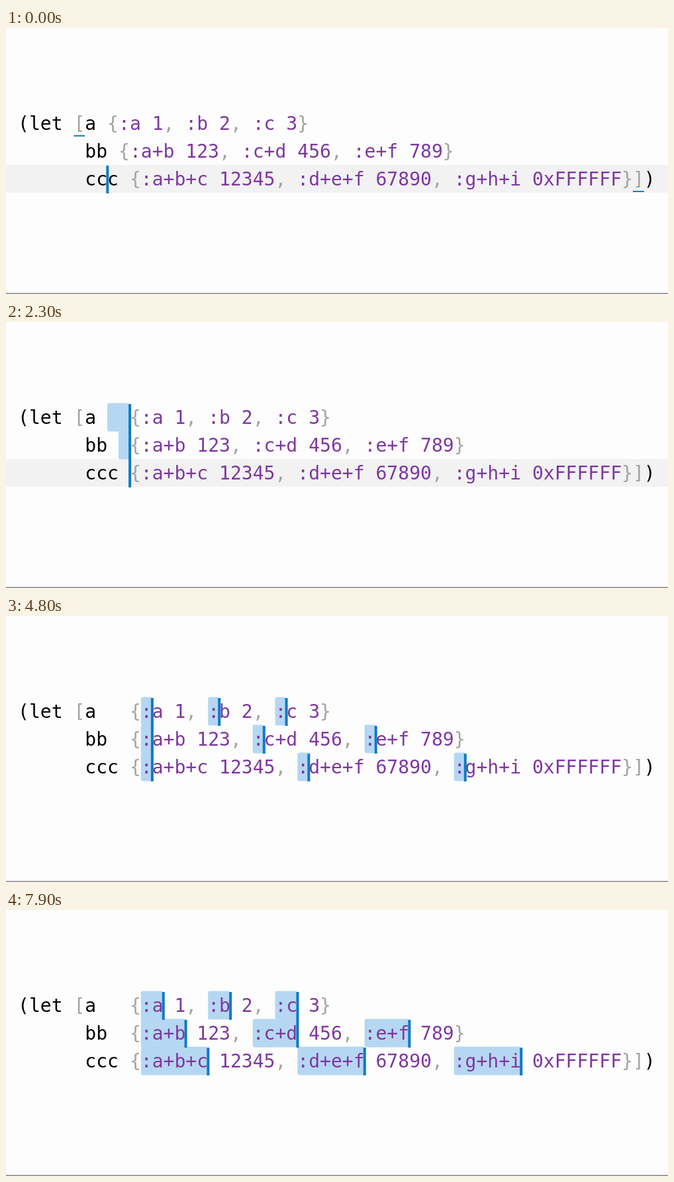
Recreate the animation shown at these times as an HTML page with a canvas. Size 1000 by 402 pixels, loop 8000 ms.

```html
<!DOCTYPE html>
<html lang="en">
<head>
<meta charset="utf-8">
<title>Aligning a let form</title>
<style>
  html, body { margin: 0; width: 100%; height: 100%; overflow: hidden; background: #fdfdfd; }
  canvas { display: block; width: 1000px; height: 402px; }
</style>
</head>
<body>
<canvas id="stage"></canvas>
<script>
const LOOP = 8000, W = 1000, H = 402;
const CHAR = 16.89, LEFT = 18, TOP = 123, LINE = 42;
const INK = {
  page: '#fdfdfd', row: '#f2f2f2', select: '#b5d7f2', caret: '#0f7ac4',
  text: '#000', value: '#7f37a0', punct: '#a3a3a0', mark: '#1a83c4', edge: '#858585'
};

const ragged = [
  '(let [a {:a 1, :b 2, :c 3}',
  '      bb {:a+b 123, :c+d 456, :e+f 789}',
  '      ccc {:a+b+c 12345, :d+e+f 67890, :g+h+i 0xFFFFFF}])'
];
const aligned = ragged.map(line => {
  const at = line.indexOf('{');
  return line.slice(0, at).padEnd(10) + line.slice(at);
});

// Every keyword as a selection: [row, start, end]
const words = aligned.flatMap((line, row) =>
  [...line.matchAll(/:[a-z+]+/g)].map(m => [row, m.index, m.index + m[0].length]));
const colons = words.map(([row, start]) => [row, start, start + 1]);

const vector = [[0, 5], [2, 55]];
const map = [[0, 10], [0, aligned[0].indexOf('}')]];

// time, lines, cursors [row, column(, end)], underlined brackets
const steps = [
  [0, ragged, [[2, 8]], vector],
  [100, ragged, [[2, 7]], vector],
  [200, ragged, [[2, 6]], vector],
  [500, ragged, [[1, 6], [2, 6]]],
  [900, ragged, [[0, 6], [1, 6], [2, 6]]],
  [1400, ragged, [[0, 7], [1, 8], [2, 9]]],
  [1700, ragged, [[0, 8], [1, 9], [2, 10]]],
  [2100, aligned, [[0, 8, 10], [1, 9, 10], [2, 10]]],
  [2800, aligned, [[0, 8, 10]]],
  [3000, aligned, [[0, 10]], vector],
  [3300, aligned, [[0, 11]], map],
  ...colons.map((_, i) => [3600 + i * 150, aligned, colons.slice(0, i + 1)]),
  [7500, aligned, words]
];

const canvas = document.getElementById('stage');
const ctx = canvas.getContext('2d');
const ratio = window.devicePixelRatio || 1;
canvas.width = W * ratio;
canvas.height = H * ratio;
ctx.scale(ratio, ratio);
ctx.font = '28.06px "DejaVu Sans Mono", monospace';

const colX = col => LEFT + col * CHAR;
const rowY = row => TOP + row * LINE;

function box(color, x, y, w, h) {
  ctx.fillStyle = color;
  ctx.fillRect(x, y, w, h);
}

function drawSelection([row, start, end]) {
  ctx.fillStyle = INK.select;
  ctx.beginPath();
  ctx.roundRect(colX(start), rowY(row) - 0.5, (end - start) * CHAR, LINE + 1, 3);
  ctx.fill();
}

function tokenColor(token) {
  if (/^[[\]{},]/.test(token)) return INK.punct;
  return /^[:\d]/.test(token) ? INK.value : INK.text;
}

function drawLine(line, row) {
  for (const m of line.matchAll(/[[\]{},]+|[^\s[\]{},]+/g)) {
    ctx.fillStyle = tokenColor(m[0]);
    ctx.fillText(m[0], colX(m.index), rowY(row) + 31);
  }
}

function draw(time) {
  const [, lines, cursors, marks = []] = steps.findLast(step => step[0] <= time);
  box(INK.page, 0, 0, W, H);
  for (const [row, , end] of cursors)
    if (end === undefined) box(INK.row, 0, rowY(row), W, LINE);
  cursors.filter(c => c.length > 2).forEach(drawSelection);
  lines.forEach(drawLine);

  for (const [row, col] of marks)
    box(INK.mark, colX(col), rowY(row) + 39, CHAR, 2);
  for (const [row, start, end = start] of cursors)
    box(INK.caret, colX(end) - 1.8, rowY(row) + 1, 4, LINE);
  box(INK.edge, 0, 400.5, W, 1.5);
}

const begin = performance.now();
function tick() {
  draw((performance.now() - begin) % LOOP);
  requestAnimationFrame(tick);
}
tick();
</script>
</body>
</html>
```
